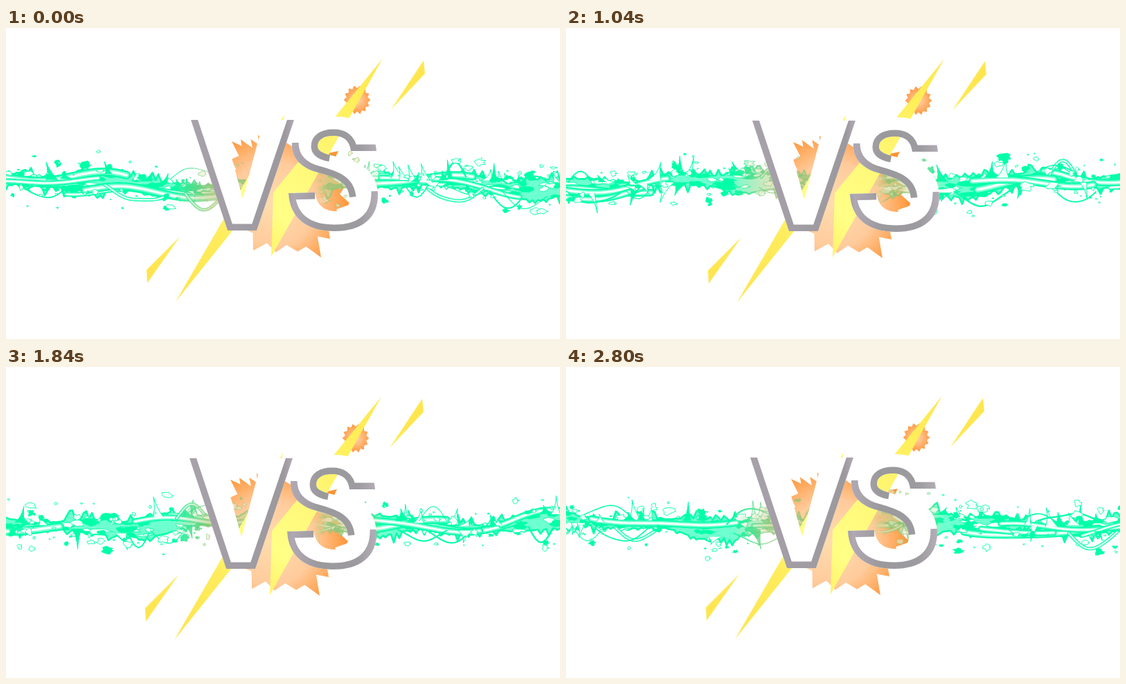
Write an HTML page with a canvas that moves like this. It is 800x450 px and loops after 2880 ms.

```html
<!DOCTYPE html>
<html lang="en">
<head>
<meta charset="utf-8">
<title>VS</title>
<style>
  html, body { margin: 0; width: 100%; height: 100%; overflow: hidden; background: #fff; }
  canvas { display: block; }
</style>
</head>
<body>
<canvas width="800" height="450" role="img" aria-label="VS"></canvas>
<script>
const ctx = document.querySelector('canvas').getContext('2d');
const STEP = 80, STEPS = 36;
const TAU = Math.PI * 2;

function randomFrom(seed) {
  const rnd = () => {
    seed = seed + 0x6D2B79F5 | 0;
    let t = Math.imul(seed ^ seed >>> 15, 1 | seed);
    t = t + Math.imul(t ^ t >>> 7, 61 | t) ^ t;
    return ((t ^ t >>> 14) >>> 0) / 4294967296;
  };
  return { rnd, between: (a, b) => a + (b - a) * rnd() };
}

function addStops(gradient, stops) {
  stops.forEach(([at, color]) => gradient.addColorStop(at, color));
  return gradient;
}
const linear = (x0, y0, x1, y1, ...stops) =>
  addStops(ctx.createLinearGradient(x0, y0, x1, y1), stops);
const radial = (x, y, r, ...stops) =>
  addStops(ctx.createRadialGradient(x, y, 0, x, y, r), stops);
const polygon = points => new Path2D('M' + points.join(' ') + 'Z');

function fill(path, color) {
  ctx.fillStyle = color;
  ctx.fill(path);
}
function stroke(path, color, width) {
  ctx.strokeStyle = color;
  ctx.lineWidth = width;
  ctx.stroke(path);
}

// Water colour across the stage: tinted near the lettering, gone in the centre
const water = (side, tint) => linear(0, 0, 800, 0,
  [0, side], [.3, side], [.37, tint], [.43, tint], [.47, 'rgba(255,210,150,0)'],
  [.55, 'rgba(255,210,150,0)'], [.58, tint], [.63, tint], [.68, side], [1, side]);
const green = water('#00ffa8', 'rgba(140,195,115,.65)');
const mint = water('#6dffd0', 'rgba(190,215,150,.6)');
const white = water('#f4fffb', 'rgba(240,232,200,.6)');

function drawSplash(step) {
  const { rnd, between } = randomFrom(step * 977 + 31);
  const wave = (length, amount) => {
    const phase = rnd() * TAU;
    return x => amount * Math.sin(x / length + phase);
  };
  const bend = wave(80, 6), ripple = wave(27, 3), swell = wave(48, 4), pulse = wave(17, 2);
  const mid = x => 226 + bend(x) + ripple(x);
  const half = x => 9 + swell(x) + pulse(x);
  ctx.lineJoin = ctx.lineCap = 'round';

  // Ragged, hollow patch of water
  function patch(x, y, r, stretch, body) {
    const points = [];
    for (let a = 0; a < TAU; a += TAU / 11) {
      const radius = r * between(.55, 1.3);
      points.push([x + radius * stretch * Math.cos(a), y + radius * Math.sin(a)]);
    }
    const shape = polygon(points);
    fill(shape, body);
    stroke(shape, green, .9);
  }

  // Strand with a green rim and a pale core
  function strand(x0, length, yAt, width) {
    const path = new Path2D();
    for (let x = x0; x <= x0 + length; x += 5) path.lineTo(x, yAt(x));
    stroke(path, green, width);
    if (width > 3) stroke(path, mint, width * .65);
    if (width > 3) stroke(path, white, width * .3);
  }

  // Main jet with a ragged edge
  const top = [], bottom = [];
  for (let x = -4; x <= 804; x += 4) {
    top.push([x, mid(x) - half(x) - 14 * rnd() ** 5]);
    bottom.unshift([x, mid(x) + half(x) + 14 * rnd() ** 5]);
  }
  const jet = polygon([...top, ...bottom]);
  fill(jet, mint);
  stroke(jet, green, 2.5);

  // Flecks and reflections inside the jet
  ctx.save();
  ctx.clip(jet);
  for (let i = 0; i < 130; i++) {
    const x = between(0, 800);
    patch(x, mid(x) + between(-12, 12), between(2, 5), between(1.5, 4), i % 3 ? green : white);
  }
  ctx.restore();

  // Tubes winding along the jet
  for (let i = 0; i < 7; i++) {
    const sway = wave(between(30, 60), between(3, 9)), shift = between(-7, 13);
    strand(between(-80, 760), between(90, 220), x => mid(x) + shift + sway(x), between(6, 13));
  }

  // Crown spikes
  for (let i = 0; i < 34; i++) {
    const x = between(0, 800), up = rnd() < .7 ? -1 : 1;
    const base = mid(x) + up * (half(x) - 3), h = up * between(8, 30);
    const w = between(4, 11), lean = between(-10, 10);
    const spike = new Path2D(`M${x - w} ${base}Q${x + lean / 2} ${base + h * .3} ${x + lean} ${base + h}
      Q${x + lean / 2 + 2} ${base + h * .4} ${x + w} ${base}`);
    fill(spike, i % 2 ? green : white);
    stroke(spike, green, 1);
  }

  // Strands arching away from the jet
  for (let i = 0; i < 12; i++) {
    const x0 = between(-20, 770), length = between(30, 95), side = rnd() < .3 ? -1 : 1;
    const h = side * between(10, 24), wobble = wave(9, 1.5);
    strand(x0, length, x => mid(x) + side * 7 + wobble(x) + h * Math.sin((x - x0) / length * Math.PI),
      i < 3 ? 5 : between(1, 2.5));
  }

  // Foam and loose drops
  for (let i = 0; i < 150; i++) {
    const x = between(0, 800), side = rnd() < .5 ? -1 : 1;
    const y = mid(x) + side * (half(x) + 30 * rnd() ** 2);
    patch(x, y, .8 + 5 * rnd() ** 2, between(.7, 2), i % 3 ? white : green);
  }
}

// Corners joined by torn edges that bite towards the centre
function torn(corners, cx, cy, bite, pieces) {
  const { between } = randomFrom(7), points = [];
  corners.forEach(([x, y], i) => {
    const [nx, ny] = corners[(i + 1) % corners.length];
    for (let k = 0; k < pieces; k++) {
      const px = x + (nx - x) * k / pieces, py = y + (ny - y) * k / pieces;
      const pull = k ? between(k % 2 ? bite * .6 : 0, k % 2 ? bite : bite * .3) : 0;
      points.push([px + (cx - px) * pull, py + (cy - py) * pull]);
    }
  });
  return polygon(points);
}
const burst = torn([[326, 164], [364, 155], [480, 178], [498, 255], [455, 332], [357, 322], [310, 235]],
  400, 230, .2, 6);
const spark = polygon(Array.from({ length: 28 }, (_, i) => {
  const r = i % 2 ? 17 : 21, a = i * TAU / 28;
  return [507 + r * Math.cos(a) * .92, 104 + r * Math.sin(a)];
}));
const bolts = [
  [245, 396, 402, 125, 384, 222],
  [544, 44, 386, 238, 383, 331],
  [603, 47, 605, 66, 556, 118],
  [251, 302, 203, 350, 204, 369]
].map(polygon);

// Each letter is a white outline whose lower edges carry a steel bevel
const legsV = 'M267 133L320 293L362 293L416 133';
const counterS = 'M535 178L498 178C496 160 484 156 473 156C458 156 450 162 450 171';
const bowlS = 'C538 276 512 294 475 294C434 294 410 275 408 239L446 238';
const letters = [
  { outline: legsV + 'L372 133L342 247L311 133Z', bevels: [legsV] },
  {
    outline: counterS + 'C450 180 463 183 485 188C518 195 536 212 537 240' + bowlS +
      'C449 256 459 265 476 265C491 265 497 257 496 245C494 224 480 217 450 209' +
      'C428 203 413 190 413 170C413 143 440 128 474 128C510 128 533 145 535 178Z',
    bevels: [counterS + 'C450 178 457 182 468 184',
      'M413 166C413 190 428 203 450 209C480 217 494 224 496 245', 'M537 236' + bowlS]
  }
].map(({ outline, bevels }) =>
  ({ outline: new Path2D(outline), bevels: bevels.map(d => new Path2D(d)) }));

const orange = radial(385, 255, 112, [0, '#ffdcae'], [.55, '#ffcb9c'], [1, '#ff9434']);
const sparkOrange = radial(507, 104, 22, [0, '#ffd6b0'], [1, '#ff9438']);
const yellow = linear(244, 396, 544, 44,
  [0, '#ffe450'], [.25, '#ffec5c'], [.42, '#ffff86'], [.6, '#fff878'], [.85, '#ffee58'], [1, '#ffe650']);
const steel = linear(267, 0, 537, 0,
  [0, '#a8a2aa'], [.5, '#9b989e'], [.55, '#b0a8b2'], [.7, '#9a999c'], [.9, '#9d9b9f'], [1, '#b4adb7']);

function drawBurst() {
  fill(burst, orange);
  fill(spark, sparkOrange);
}

function drawLetters() {
  bolts.forEach(bolt => fill(bolt, yellow));
  ctx.lineJoin = 'miter';
  ctx.lineCap = 'butt';
  for (const { outline, bevels } of letters) {
    ctx.save();
    fill(outline, '#fff');
    ctx.clip(outline);
    bevels.forEach(path => stroke(path, steel, 19));
    ctx.restore();
  }
}

function shaken(step, draw) {
  const a = step / STEPS * TAU;
  ctx.save();
  ctx.translate(Math.round(Math.sin(a) + 2 * Math.sin(3 * a)), Math.round(3 * Math.sin(4 * a)));
  draw();
  ctx.restore();
}

let shown = -1;
function frame(now) {
  const step = Math.floor(now / STEP) % STEPS;
  if (step !== shown) {
    shown = step;
    ctx.fillStyle = '#fff';
    ctx.fillRect(0, 0, 800, 450);
    shaken(step, drawBurst);
    drawSplash(step);
    shaken(step, drawLetters);
  }
  requestAnimationFrame(frame);
}
frame(0);
</script>
</body>
</html>
```
